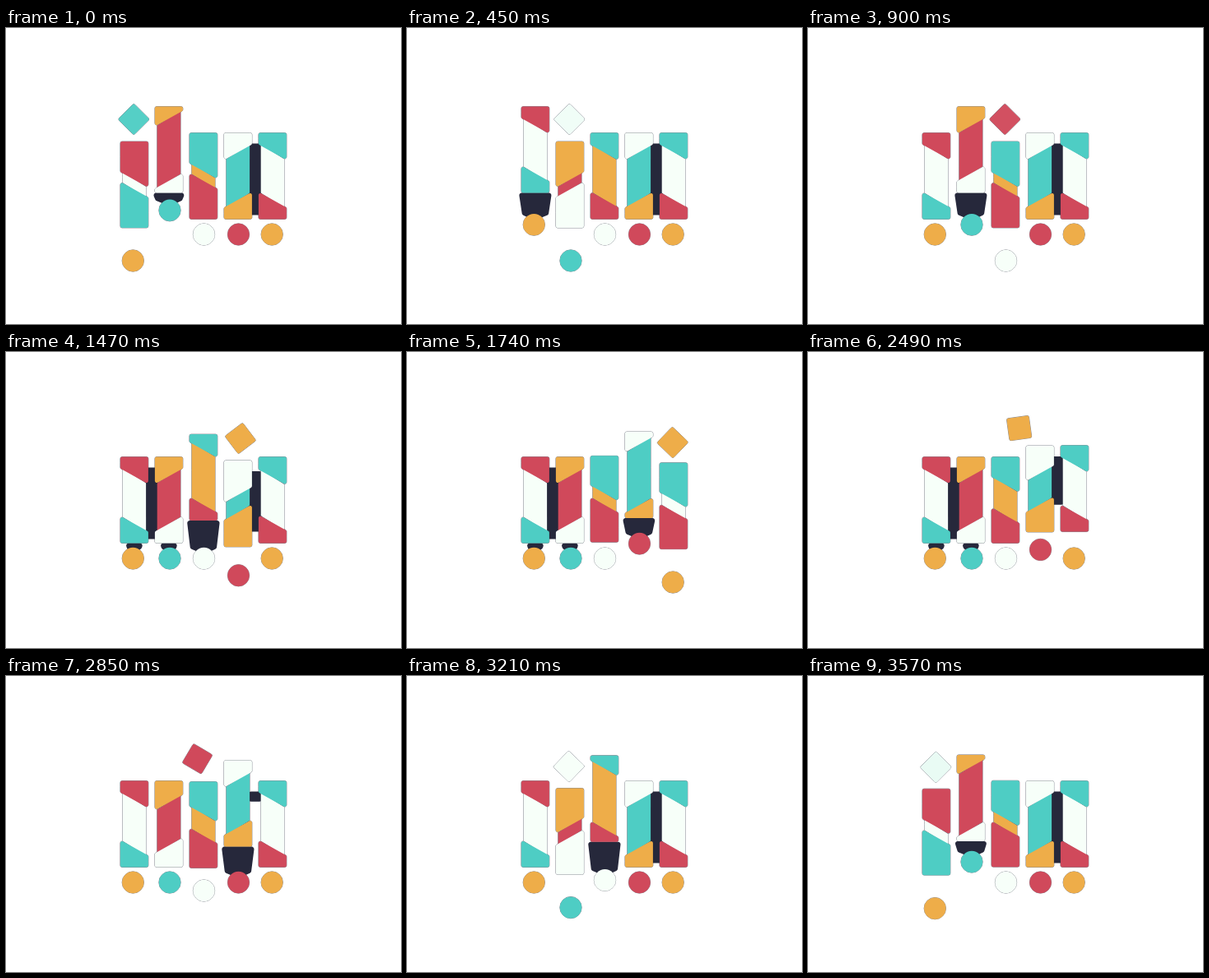
Write an HTML page with a canvas that moves like this. It is 480 px wide and 360 px high and loops after 3.6 s.

```html
<!DOCTYPE html>
<html lang="en">
<head>
<meta charset="utf-8">
<title>Bouncing square</title>
<style>
  html, body { margin: 0; width: 100%; height: 100%; overflow: hidden; background: #fff; }
  canvas { display: block; width: 480px; height: 360px; }
</style>
</head>
<body>
<canvas id="stage" width="480" height="360"></canvas>
<script>
const ctx = document.getElementById('stage').getContext('2d');
const HOP = 450, LOOP = 8 * HOP, STEP = 30;
const TOP = 127.5, TALL = 105, PITCH = 42, BALL_Y = 251, RISE = 19;
const TEAL = [78, 205, 196], RED = [208, 73, 91], GOLD = [238, 173, 73],
      PALE = [247, 255, 249], DARK = '#26283b';

// top, middle, bottom, ball
const COLOURS = [
  [RED, PALE, TEAL, GOLD],
  [GOLD, RED, PALE, TEAL],
  [TEAL, GOLD, RED, PALE],
  [PALE, TEAL, GOLD, RED],
  [TEAL, PALE, RED, GOLD]
];
const BALL_X = [154.3, 199, 240.5, 282.5, 323.2];

const css = c => `rgb(${c.map(Math.round)})`;
const mix = (a, b, k) => a.map((v, i) => v + (b[i] - v) * k);
const clamp = v => Math.max(0, Math.min(1, v));
const ease = (p, n) => p < .5 ? (2 * p) ** n / 2 : 1 - (2 - 2 * p) ** n / 2;

// eased value of a looping list of [time, value] keys
function at(keys, t, power) {
  let i = keys.findLastIndex(k => k[0] <= t);
  const wraps = i < 0;
  if (wraps) i = keys.length - 1;
  const [a, b] = [keys[i], keys[(i + 1) % keys.length]];
  const from = wraps ? a[0] - LOOP : a[0];
  const to = b[0] > from ? b[0] : b[0] + LOOP;
  return mix([a[1]], [b[1]], ease((t - from) / (to - from), power))[0];
}

// repeats one reaction after every hit; gap is the number of hops to the next hit
function react(hits, keysFor) {
  return hits.flatMap((h, i) => {
    const next = hits[i + 1] ?? hits[0] + LOOP;
    return keysFor(h, next, (next - h) / HOP);
  }).map(([t, v]) => [t % LOOP, v]).sort((a, b) => a[0] - b[0]);
}

const liftKeys = (h, next, gap) => [
  [h, 10.5], [h + HOP, -32],
  ...(gap > 2 ? [[h + 2 * HOP, 0], [next - 150, 0]] : [])
];

const ballKeys = (h, next, gap) => [
  [h, 32], [h + 300, -12],
  ...(gap > 2 ? [[h + 430, -12], [h + 560, 0]] : [[h + 510, -31]]),
  [next - 210, 0]
];

// short side of the caps: squeezed by a hit, stretched, then back to rest
const capKeys = (h, next, gap) => [
  [h, 37],
  [h + HOP, gap > 4 ? 14 : 5],
  ...(gap === 4 ? [[h + 2 * HOP, 37]] : []),
  ...(gap > 2 ? [[next - 400, 14]] : [])
];

const columns = COLOURS.map((colours, i) => {
  const hits = [...new Set([i * HOP, (8 - i) * HOP % LOOP])];
  return {
    colours, x: 155.9 + PITCH * i, ballX: BALL_X[i], lean: i % 2 ? -1 : 1,
    lift: react(hits, liftKeys),
    ball: react(hits, ballKeys),
    cap: react(hits, capKeys)
  };
});

function pose(t) {
  return columns.map(c => {
    const lift = at(c.lift, t, 2);
    return {
      ...c, lift, y: TOP + lift, end: TOP + lift + TALL,
      cap: at(c.cap, t, 2), ballY: BALL_Y + at(c.ball, t, 3)
    };
  });
}

function squareAt(t) {
  const hop = Math.floor(t / HOP), p = t / HOP - hop, e = ease(p, 2.8);
  const stop = k => 4 - Math.abs(4 - (k + 8) % 8);
  const [last, a, b] = [hop - 1, hop, hop + 1].map(stop);
  const tint = i => COLOURS[i][2];
  return {
    x: 155.3 + PITCH * (a + (b - a) * e),
    y: 111 - 76 * e * (1 - e),
    turn: (b - a) * e * Math.PI / 2,
    colour: p === 0 ? mix(tint(last), tint(a), .96)
                    : mix(tint(a), tint(b), clamp((p * HOP - 417) / 35))
  };
}

function poly(pts, r = 0) {
  const p = new Path2D(), n = pts.length, [a, b] = [pts[n - 1], pts[0]];
  p.moveTo((a[0] + b[0]) / 2, (a[1] + b[1]) / 2);
  pts.forEach((q, i) => p.arcTo(...q, ...pts[(i + 1) % n], r));
  p.closePath();
  return p;
}

function paint(parts) {
  ctx.strokeStyle = 'rgba(38,40,59,.55)';
  ctx.lineWidth = 1;
  parts.forEach(([path]) => ctx.stroke(path));
  parts.forEach(([path, colour]) => {
    ctx.fillStyle = css(colour);
    ctx.fill(path);
  });
}

function drawColumn({ x, y, end, cap, lean, colours }) {
  const w = 17 * lean, m = 14.2 * lean, long = cap + RISE;
  const top = poly([[x - w, y], [x + w, y], [x + w, y + long], [x - w, y + cap]], 2.2);
  const low = poly([[x + w, end], [x - w, end], [x - w, end - long], [x + w, end - cap]], 2.2);
  const mid = poly([[x - m, y + cap], [x + m, y + long - 1], [x + m, end - cap], [x - m, end - long + 1]]);
  paint([[mid, colours[1]], [top, colours[0]], [low, colours[2]]]);
}

function drawBall({ ballX, ballY, colours }) {
  const p = new Path2D();
  p.arc(ballX, ballY, 13.2, 0, 7);
  paint([[p, colours[3]]]);
}

function drawGap(a, b) {
  const x = (a.x + b.x) / 2, top = Math.max(a.y, b.y) + 13;
  const low = Math.min(a.end, b.end) - 5 - 2 * Math.max(Math.abs(a.lift), Math.abs(b.lift));
  if (low > top) ctx.fill(poly([[x - 8, top], [x + 8, top], [x + 8, low], [x - 8, low]], 3));
}

function drawFoot({ x, end, ballX, ballY }, w) {
  ctx.fill(poly([[x - w, end], [x + w, end], [x + w * .8, ballY - 12],
    [ballX, ballY - 5], [x - w * .8, ballY - 12]], 3));
}

function drawShade(cols, onRight) {
  ctx.fillStyle = DARK;
  drawGap(cols[3], cols[4]);
  if (onRight) {
    drawGap(cols[0], cols[1]);
    cols.slice(0, 2).forEach(c => drawFoot(c, 11));
  }
  cols.filter(c => c.lift < -24).forEach(c => drawFoot(c, 20));
}

function drawSquare({ x, y, turn, colour }) {
  const pts = [0, 1, 2, 3].map(k => {
    const g = turn + k * Math.PI / 2;
    return [x + 19.2 * Math.cos(g), y + 19.2 * Math.sin(g)];
  });
  paint([[poly(pts, 2), colour]]);
}

function draw(t) {
  const cols = pose(t), square = squareAt(t);
  ctx.fillStyle = '#fff';
  ctx.fillRect(0, 0, 480, 360);
  drawShade(cols, square.x > 245);
  cols.forEach(drawColumn);
  cols.forEach(drawBall);
  drawSquare(square);
}

const start = performance.now();
function tick() {
  const t = (performance.now() - start) % LOOP;
  draw(Math.floor(t / STEP) * STEP);
  requestAnimationFrame(tick);
}
tick();
</script>
</body>
</html>
```
